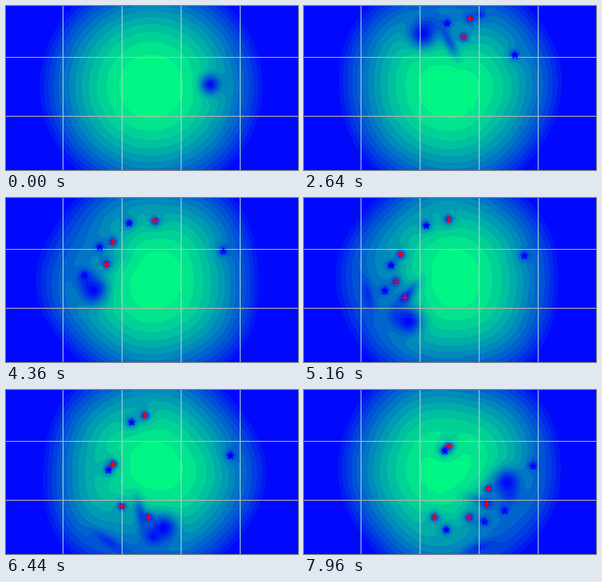
Write a matplotlib script that moves like this. It is 366 by 206 pixels and loops after 8000 ms.

```python
import numpy as np
import matplotlib.pyplot as plt
from matplotlib.animation import FuncAnimation

W, H, DPI = 366, 206, 100
STEP, FRAMES = 40, 200
CX, CY, UNIT, R_CLOUD = 182, 101, 74, 144
LEVELS = np.linspace(0, 1, 15)

X, Y = np.meshgrid(np.linspace(0, W, 184), np.linspace(0, H, 104))


def ease(v):
    v = np.clip(v, 0, 1)
    return v * v * (3 - 2 * v)


def stir_angle(t):
    return 2 + 43.5 * t


def polar(deg, radius):
    a = np.radians(deg)
    return CX + radius * np.cos(a), CY - radius * np.sin(a)


def shed(birth, side, *keys):
    """Track of a vortex born in the wake, inside (-1) or outside (+1) the orbit."""
    start = polar(stir_angle(birth) - 13, UNIT + 10 * side)
    return np.array([(birth, *start), *keys])


PLUS = [
    shed(.85, -1, (1.2, 245, 60), (2.64, 208, 16), (3.6, 184, 0)),
    shed(1.9, -1, (2.64, 200, 39), (5.16, 181, 27), (6.44, 174, 32), (8, 182, 72)),
    shed(2.9, -1, (3.52, 150, 43), (5.16, 121, 71), (7, 143, 102)),
    shed(3.2, -1, (3.52, 142, 60), (5.16, 115, 105), (6.44, 145, 146), (8, 164, 160)),
    shed(4.6, -1, (5.16, 127, 125), (6.44, 179, 160), (8, 208, 160)),
    shed(7.1, -1, (8, 230, 142)),
    shed(7.6, -1, (8, 231, 122)),
]
STAR = [
    shed(.55, 1, (2.64, 264, 61), (5.16, 276, 72), (8, 287, 95)),
    shed(.8, 1, (1.2, 254, 46), (2.5, 222, 11)),
    shed(2.2, 1, (3.52, 161, 28), (5.16, 153, 34), (6.44, 157, 40), (8, 176, 77)),
    shed(3.1, 1, (3.52, 131, 38), (5.16, 109, 84), (7, 139, 106)),
    shed(4.3, 1, (5.16, 101, 116), (5.8, 112, 140)),
    shed(6.5, 1, (8, 178, 175)),
    shed(7.0, 1, (8, 226, 164)),
    shed(7.5, 1, (8, 252, 150)),
]


def follow(track, t):
    """Smooth curve through the track points."""
    times, pos = track[:, 0], track[:, 1:]
    slope = np.gradient(pos, times, axis=0)
    t = np.clip(t, times[0], times[-1])
    i = min(np.searchsorted(times, t, side="right") - 1, len(times) - 2)
    h = times[i + 1] - times[i]
    u = (t - times[i]) / h
    return (pos[i] + (pos[i + 1] - pos[i]) * ease(u)
            + h * u * (1 - u) * ((1 - u) * slope[i] - u * slope[i + 1]))


def blob(center, long, short, angle=0):
    a = np.radians(angle)
    dx, dy = X - center[0], Y - center[1]
    u = dx * np.cos(a) - dy * np.sin(a)
    v = dx * np.sin(a) + dy * np.cos(a)
    return np.exp(-(u / long) ** 2 / 2 - (v / short) ** 2 / 2)


def cloud(t):
    dx, dy = X - CX, Y - CY
    theta = np.arctan2(-dy, dx)
    ripple = np.sin(3 * theta - 1.1 * t) + .7 * np.sin(5 * theta + 1.7 * t)
    r = np.hypot(dx, dy) * (1 + .022 * ease(t / 5) * ripple)
    n = 1.005 - (r / R_CLOUD) ** 2
    return .015 * np.logaddexp(0, n / .015)


def wake(t, period, first, lag, radius, tilt, depth):
    """Dark streaks that swell and fade behind the stirrer, once per period."""
    n = 1
    for mid in np.arange(first, 9, period):
        if abs(t - mid) < period / 2:
            swell = depth * np.cos(np.pi * (t - mid) / period) ** 2
            deg = stir_angle(mid) - lag(mid) + 20 * (t - mid)
            n = n * (1 - swell * blob(polar(deg, radius), 15, 5, deg + tilt))
    return n


def density(t):
    grow, deg = ease(t / 4), stir_angle(t)
    n = cloud(t)
    n *= 1 - .22 * grow * blob(polar(deg - 32, 88), 36, 36)
    n *= wake(t, 1.28, 1.3, lambda m: 25, 57, 25, .6)
    n *= wake(t, 1.43, 3.6, lambda m: 8 * (m - 1), 104, 90, .6)
    for track in PLUS + STAR:
        age, left = t - track[0, 0], track[-1, 0] - t
        env = ease(age / .3 + 1) * ease(left / .4 + 1)
        if env > 0:
            x, y = follow(track, t)
            n *= 1 - env / (1 + (((X - x) ** 2 + (Y - y) ** 2) / 22) ** 1.3)
    size = 8.5 + 3 * ease(t / 1.2)
    n *= 1 - .5 * grow * blob(polar(deg - 11, 82), 9, 9)
    n *= 1 - .98 * blob(polar(deg, UNIT), size, size)
    return np.clip(n, 0, .999)


def alive(tracks, t):
    pts = [follow(k, t) for k in tracks if k[0, 0] <= t <= k[-1, 0]]
    return np.reshape(pts, (-1, 2)).T


fig = plt.figure(figsize=(W / DPI, H / DPI), dpi=DPI, facecolor="blue")
ax = fig.add_axes([0, 0, 1, 1])
ax.set_axis_off()
for k in (-1.5, -.5, .5, 1.5):
    ax.axvline(CX + k * UNIT, color="#9fd8dc", lw=.72, zorder=2)
for k in (-.5, .5):
    ax.axhline(CY + k * UNIT, color="#bdb8a8", lw=.72, zorder=2)
plus, = ax.plot([], [], "r+", ms=6.3, mew=1.5, zorder=3)
star, = ax.plot([], [], "b*", ms=6.3, mew=.5, zorder=3)
layer = []


def draw(frame):
    t = frame * STEP / 1000
    while layer:
        layer.pop().remove()
    layer.append(ax.contourf(X, Y, density(t), LEVELS, cmap="winter", zorder=1))
    plus.set_data(*alive(PLUS, t))
    star.set_data(*alive(STAR, t))
    ax.set(xlim=(0, W), ylim=(H, 0))
    return [plus, star]


anim = FuncAnimation(fig, draw, frames=FRAMES, interval=STEP, repeat=True, repeat_delay=0)
plt.show()
```
